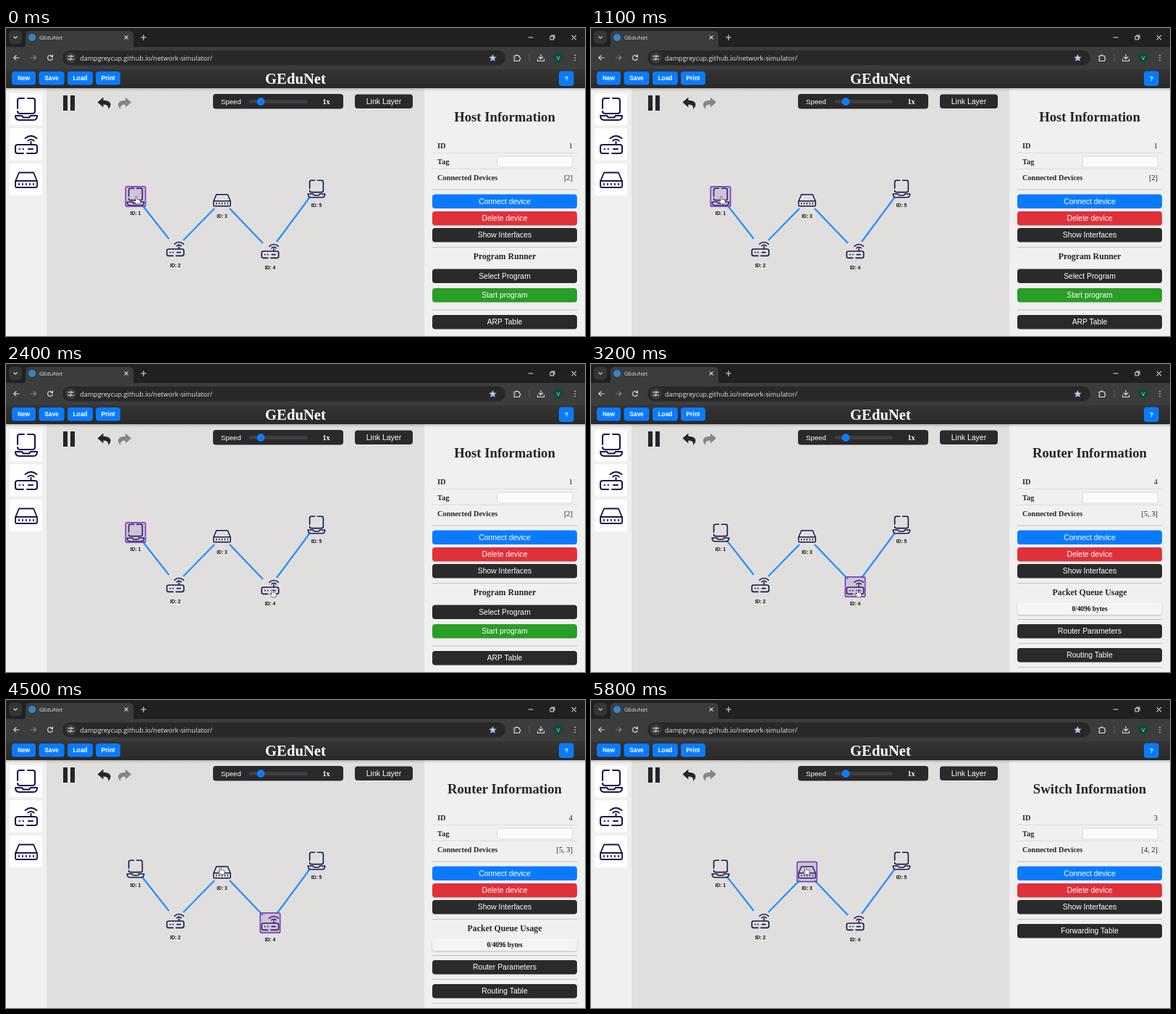
Write an HTML page that moves like this. It is 800x425 px and loops after 5.9 s.

```html
<!DOCTYPE html>
<html lang="en">
<head>
<meta charset="utf-8">
<title>GEduNet</title>
<style>
  html, body { margin: 0; width: 100%; height: 100%; overflow: hidden; background: #e0dfde; }
  svg { display: block; width: 800px; height: 425px; }
  .sans { font-family: "Liberation Sans", Arial, sans-serif; }
  .serif { font-family: "Liberation Serif", Times, serif; }
  .ui { font-family: "Open Sans", "Noto Sans", sans-serif; }
  .bold { font-weight: bold; }
  .mid { text-anchor: middle; }
  .end { text-anchor: end; }
  .line { fill: none; stroke-linecap: round; stroke-linejoin: round; }
</style>
</head>
<body>
<svg id="stage" viewBox="0 0 800 425" xmlns="http://www.w3.org/2000/svg">
  <defs>
    <linearGradient id="bar" x2="0" y2="1">
      <stop stop-color="#353535"/><stop offset="1" stop-color="#292929"/>
    </linearGradient>
    <linearGradient id="shade" x2="0" y2="1">
      <stop stop-color="#000" stop-opacity=".2"/><stop offset="1" stop-color="#000" stop-opacity="0"/>
    </linearGradient>
    <filter id="lift" x="-5%" y="-30%" width="110%" height="180%">
      <feDropShadow dx="0" dy="1" stdDeviation="1.2" flood-opacity=".22"/>
    </filter>
    <g id="host" class="line" stroke="#171a4a" stroke-width="2.1">
      <path d="M-3-15H-9Q-12-15-12-12V-1M-12 3Q-12 6-9 6H9Q12 6 12 3V-12Q12-15 9-15H2"/>
      <path d="M-6 9H-15Q-15 15-10 15H10Q15 15 15 9H6L4 11.5H-4Z"/>
    </g>
    <g id="router" class="line" stroke="#171a4a" stroke-width="2.1">
      <path d="M-4 12H-12Q-15 12-15 9V3Q-15 0-12 0H12Q15 0 15 3V9Q15 12 12 12H1"/>
      <path d="M-9.5 6h.6M-4.5 6h.6M3 6H9M6.5 0V-4M2.5-5.5Q6.5-9 10.5-5.5M-1.5-8.8Q6.5-15.5 14.5-8.8"/>
    </g>
    <g id="switch" class="line" stroke="#171a4a" stroke-width="1.9">
      <path d="M-10-10H10L15 2V9Q15 10.5 13.5 10.5H-13.5Q-15 10.5-15 9V2ZM-15 1.5H15"/>
      <path d="M-10 5v2M-5 5v2M0 5v2M5 5v2M10 5v2" stroke-width="1.7"/>
    </g>
  </defs>

  <!-- browser window -->
  <path d="M0 0H800V30H0Z" fill="#1f2020"/>
  <rect x="4" y="4" width="18" height="18" rx="5" fill="#343535"/>
  <path d="M22 27Q27 27 27 22V10Q27 4 33 4H170Q176 4 176 10V22Q176 27 181 27Z" fill="#3c3c3c"/>
  <path d="M0 26H800V57H0Z" fill="#3c3c3c"/>
  <rect x="78" y="31" width="612" height="20.5" rx="10.2" fill="#282828"/>
  <circle cx="36" cy="13" r="5" fill="#2d86cf"/>
  <text class="ui" x="46" y="16" font-size="7.7" fill="#e3e3e3">GEduNet</text>
  <text class="ui" x="102" y="44.5" font-size="9.1" fill="#e3e3e3">dampgreycup.github.io/network-simulator/</text>
  <g class="line" stroke="#dedede" stroke-width="1.1">
    <path d="M10.8 12l2.2 2.2 2.2-2.2M164 10.8l4.4 4.4m0-4.4l-4.4 4.4M186.5 13h7M190 9.500v7"/>
    <path d="M722 13h6M752 11.500h4.500v4.500h-4.500ZM753.500 10h4.500v4.500M782 10.300l5.500 5.500m0-5.500l-5.500 5.500"/>
    <path d="M18 41H10.800M14 37.800L10.800 41 14 44.200"/>
    <path d="M34.500 41H41.700M38.500 37.800L41.700 41 38.500 44.200" stroke="#858585"/>
    <path d="M64 39.200A3.500 3.500 0 1 0 64.300 42.300M64.500 37v2.600H61.900"/>
    <path d="M739 36.500v6M736.200 40l2.800 2.800 2.800-2.800M734.500 43v2.500h9V43"/>
    <path d="M702 38.500h2.500a1.400 1.400 0 0 1 2.800 0H709.500v2.200a1.400 1.400 0 0 1 0 2.800V45.500H702v-2.300a1.300 1.300 0 0 0 0-2.500Z"/>
  </g>
  <circle cx="89.500" cy="41" r="7.500" fill="#3c3c3c"/>
  <g class="line" stroke="#dedede">
    <path d="M85.500 39h2.500M92 39h1.500M85.500 43h1.500M91 43h2.500"/>
    <circle cx="90" cy="39" r="1.300"/><circle cx="89" cy="43" r="1.300"/>
  </g>
  <path d="M672.500 36.200l1.500 3.300 3.600.4-2.700 2.400.8 3.600-3.200-1.900-3.200 1.900.8-3.600-2.700-2.400 3.600-.4Z" fill="#a8c7fa"/>
  <path d="M723 36v10" stroke="#606060"/>
  <circle cx="763" cy="41" r="7" fill="#0d4b3d"/>
  <text class="ui mid" x="763" y="43.800" font-size="7.500" fill="#dfe9e5">V</text>
  <path d="M786 37.500h.01M786 41h.01M786 44.500h.01" class="line" stroke="#dedede" stroke-width="1.700"/>

  <!-- page -->
  <path d="M0 57H800V83H0Z" fill="url(#bar)"/>
  <path d="M56 83H578V425H56Z" fill="#e0dfde"/>
  <path d="M0 83H56V425H0ZM578 83H800V425H578Z" fill="#f0f0f0"/>
  <path d="M0 83H800V87H0Z" fill="url(#shade)"/>
  <text class="serif bold mid" x="400" y="77" font-size="20.700" fill="#fff">GEduNet</text>
  <g id="menu"></g>
  <g id="tiles"></g>
  <path d="M79 93h6v21h-6ZM89 93h6v21h-6Z" fill="#252527"/>
  <path id="undo" d="M126.500 102.500L134.500 95.500V99.700Q145 100 144.500 106.500 144.200 109.500 141.200 112 142.700 105.700 134.500 105.500V109.500Z" fill="#252527"/>
  <use href="#undo" transform="matrix(-1 0 0 1 299.500 0)" opacity=".48"/>
  <rect x="286" y="91" width="180" height="20.500" rx="4" fill="#2a2a2c"/>
  <text class="sans" x="297" y="104.500" font-size="9.600" fill="#fff">Speed</text>
  <rect x="336.500" y="99" width="80.500" height="5" rx="2.500" fill="#3f3f41"/>
  <circle cx="352" cy="101.500" r="5.400" fill="#0a80ff"/>
  <text class="serif bold mid" x="442.500" y="104.700" font-size="10" fill="#fff">1x</text>

  <g id="links" stroke="#1e90ff" stroke-width="2.200"></g>
  <g id="devices"></g>
  <g id="selection">
    <rect x="-13.700" y="-13.700" width="27.400" height="27.400" rx="2" fill="#8a4fd0" fill-opacity=".2" stroke="#7b45b4" stroke-width="1.700"/>
  </g>
  <g id="panels"></g>

  <g id="cursor" stroke="#333" stroke-width=".7" stroke-linejoin="round" fill="#fff">
    <path id="hand" d="M-2-4Q-2-5.200-1-5.200 0-5.200 0-4V-1Q1.200-1.600 1.700-.6 3-1 3.300 0 4.500-.2 4.500 1V2.500Q4.500 4 3.600 5.200H-1.400Q-2.400 3.600-4 1.700-4.400.7-3.400.5-2.700.5-2 1.400Z"/>
    <path id="arrow" d="M-1.500-5V4.500L.6 2.600 2 5.600 3.300 5 2 2.200H5Z"/>
  </g>
</svg>
<script>
const LOOP = 5900, STEP = 100;
const DARK = '#2a2a2c', BLUE = '#0a7bff', RED = '#e23039', GREEN = '#2a9d25';
const $ = id => document.getElementById(id);

const text = (x, y, size, content, cls, fill = '#252527') =>
  `<text x="${x}" y="${y}" font-size="${size}" class="${cls}" fill="${fill}">${content}</text>`;
const box = (x, y, w, h, r, fill, extra = '') =>
  `<rect x="${x}" y="${y}" width="${w}" height="${h}" rx="${r}" fill="${fill}" ${extra}/>`;
const button = (x, y, w, h, label, fill = DARK, size = 10.4, cls = 'sans mid') =>
  box(x, y, w, h, 4, fill) + text(x + w / 2, y + h / 2 + size * .35, size, label, cls, '#fff');
const wide = (y, label, fill) => button(589, y, 200, 19.5, label, fill);
const rule = (y, color = '#c4c4c4') => `<path d="M589 ${y}H789" stroke="${color}"/>`;
const heading = label => text(689, 319, 11.8, label, 'serif bold mid');

const devices = [
  { id: 1, kind: 'host', x: 179, y: 233 },
  { id: 2, kind: 'router', x: 234, y: 305 },
  { id: 3, kind: 'switch', x: 298.5, y: 237.5 },
  { id: 4, kind: 'router', x: 365, y: 308 },
  { id: 5, kind: 'host', x: 429, y: 222 }
];

$('menu').innerHTML = [['New', 8, 33], ['Save', 45.5, 35], ['Load', 85, 35], ['Print', 124, 34]]
  .map(([label, x, w]) => button(x, 60, w, 18.5, label, BLUE, 8.4, 'sans bold mid')).join('')
  + button(764, 59.5, 20.5, 20.5, '?', BLUE, 8.6, 'sans bold mid')
  + button(482, 91.5, 80, 19.5, 'Link Layer', DARK, 10.5);

$('tiles').innerHTML = ['host', 'router', 'switch'].map((kind, i) =>
  box(5, 90 + i * 48.5, 45, 44, 3, '#fff') +
  `<use href="#${kind}" x="28" y="${[112, 161, 209.5][i]}"/>`).join('');

$('links').innerHTML = '<path d="M188 244L225 291M245 293L288 249M309 249L355 297M374 295L420 233" fill="none"/>';

$('devices').innerHTML = devices.map(({ id, kind, x, y }) =>
  `<use href="#${kind}" transform="translate(${x} ${y}) scale(.78)"/>` +
  text(x, y + 24.5, 6.8, `ID: ${id}`, 'sans bold mid', '#111')).join('');

function panel(kind, id, neighbours, body) {
  return `<g id="${kind}Panel">` +
    text(689, 129, 18.7, `${kind} Information`, 'serif bold mid') +
    text(596, 166, 10.4, 'ID', 'serif bold') + text(783, 166, 10.4, id, 'serif end') +
    rule(172.5, '#dcdcdc') + text(596, 188, 10.4, 'Tag', 'serif bold') +
    box(679, 177, 104, 15, 2, '#fafafa', 'stroke="#d8d8dc"') + rule(194.5, '#dcdcdc') +
    text(596, 210, 10.4, 'Connected Devices', 'serif bold') +
    text(783, 210, 10.4, `[${neighbours}]`, 'serif end') + rule(223) +
    wide(229.5, 'Connect device', BLUE) + wide(253, 'Delete device', RED) +
    wide(276, 'Show Interfaces') + rule(302.5) + body + '</g>';
}

$('panels').innerHTML =
  panel('Host', 1, '2', heading('Program Runner') + wide(332.5, 'Select Program') +
    wide(359, 'Start program', GREEN) + rule(389) + wide(396, 'ARP Table')) +
  panel('Router', 4, '5, 3', heading('Packet Queue Usage') +
    box(589, 329, 200, 17, 4, '#f4f4f4', 'filter="url(#lift)"') +
    text(689, 340.5, 9.4, '0/4096 bytes', 'serif bold mid', '#111') + rule(352.5) +
    wide(359, 'Router Parameters') + rule(385.5) + wide(392, 'Routing Table') + rule(418.5)) +
  panel('Switch', 3, '4, 2', wide(309, 'Forwarding Table'));

const stops = [
  { t: 0, x: 181, y: 237.5 }, { t: 1700, x: 181, y: 237.5 },
  { t: 2300, x: 369, y: 316.5 }, { t: 3700, x: 369, y: 316.5 },
  { t: 4300, x: 297.5, y: 235.5 }, { t: LOOP, x: 297.5, y: 235.5 }
];

function cursorAt(t) {
  const i = stops.findIndex(s => s.t > t), a = stops[i - 1], b = stops[i];
  const p = (t - a.t) / (b.t - a.t), k = p * p * (3 - 2 * p);
  return { x: a.x + (b.x - a.x) * k, y: a.y + (b.y - a.y) * k };
}

const show = (id, visible) => $(id).setAttribute('visibility', visible ? 'visible' : 'hidden');

function draw(now) {
  const t = Math.floor((now % LOOP) / STEP) * STEP;
  const active = t < 2700 ? 'Host' : t < 4700 ? 'Router' : 'Switch';
  const chosen = devices[{ Host: 0, Router: 3, Switch: 2 }[active]];
  const { x, y } = cursorAt(t);
  const hovering = devices.some(d => Math.hypot(d.x - x, d.y - y) < 15);
  for (const kind of ['Host', 'Router', 'Switch']) show(kind + 'Panel', kind === active);
  $('selection').setAttribute('transform', `translate(${chosen.x} ${chosen.y - .5})`);
  $('cursor').setAttribute('transform', `translate(${x} ${y})`);
  show('hand', hovering);
  show('arrow', !hovering);
}

let start;
function tick(now) {
  start ??= now;
  draw(now - start);
  requestAnimationFrame(tick);
}
draw(0);
requestAnimationFrame(tick);
</script>
</body>
</html>
```
